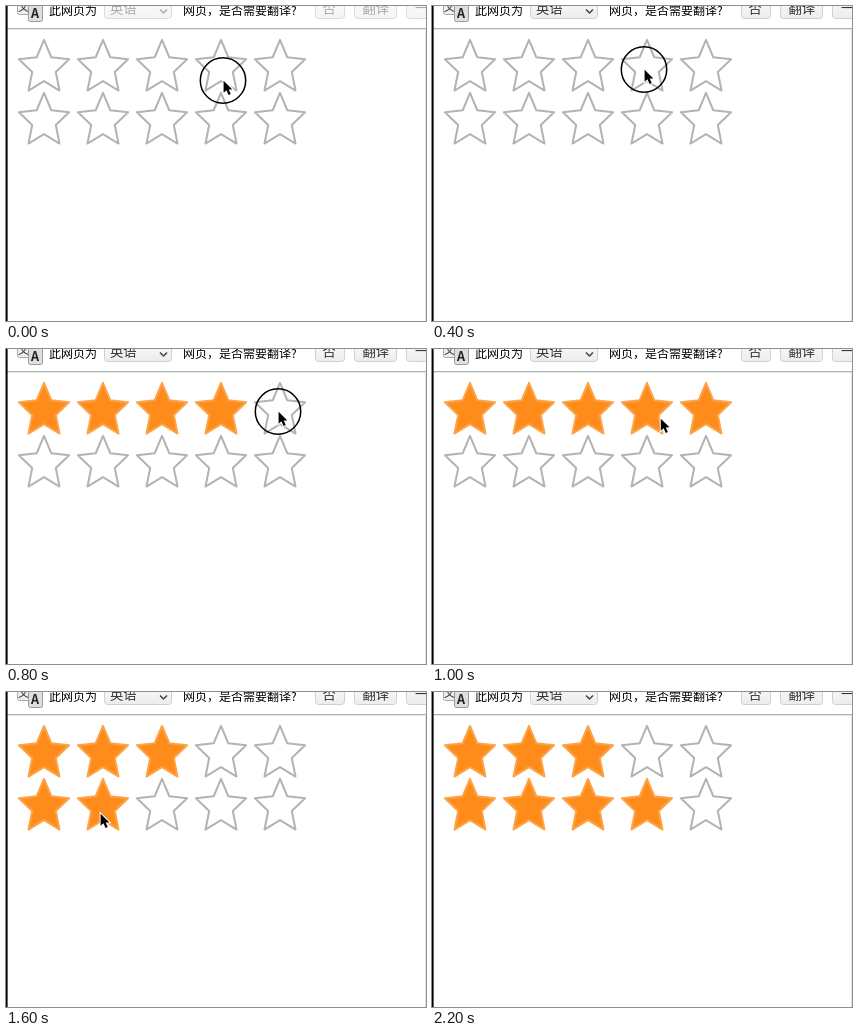
An HTML page with a canvas that plays this animation: 420 by 315 pixels, repeating every 2.3 s.

```html
<!DOCTYPE html>
<html lang="zh-CN">
<head>
<meta charset="utf-8">
<title>评分</title>
<style>
html, body { margin: 0; width: 100%; height: 100%; overflow: hidden; background: #fff; }
canvas { display: block; width: 420px; height: 315px; }
</style>
</head>
<body>
<canvas id="stage" width="420" height="315"></canvas>
<script>
const ctx = document.getElementById('stage').getContext('2d');
const LOOP = 2300, STEP = 100;
const FONT = '"Noto Sans CJK SC", "Noto Sans CJK", "Noto Sans", sans-serif';

// each press rates its row one step later
const PRESSES = [
  { at: 0, x: 217, y: 74, row: 0, count: 0 },
  { at: 400, x: 212, y: 63, row: 0, count: 4 },
  { at: 800, x: 272, y: 62, row: 0, count: 5 },
  { at: 1200, x: 158, y: 62, row: 0, count: 3 },
  { at: 1500, x: 94, y: 121, row: 1, count: 2 },
  { at: 1900, x: 216, y: 114, row: 1, count: 4 }
];
const EXIT = { at: 2200, x: 372, y: -30 };

// rest for one step after a press, then glide on a sagging line
function pointerAt(t) {
  const from = PRESSES.filter(p => p.at <= t).pop();
  const to = PRESSES.find(p => p.at > t) || EXIT;
  const k = (t - from.at - STEP) / (to.at - from.at - STEP);
  const e = Math.pow(Math.min(1, Math.max(0, k)), 0.87);
  const dx = to.x - from.x, dy = to.y - from.y;
  return [from.x + dx * e, from.y + dy * e + 0.065 * Math.abs(dx) * Math.sin(Math.PI * e)];
}

function ratingAt(row, t) {
  const last = PRESSES.filter(p => p.row === row && p.at + STEP <= t).pop();
  return last ? last.count : 0;
}

function text(s, x, y, size, color, weight = '') {
  ctx.font = `${weight} ${size}px ${FONT}`;
  ctx.fillStyle = color;
  ctx.fillText(s, x, y);
}

function box(x, y, w, h, r, fill, stroke) {
  ctx.beginPath();
  ctx.roundRect(x, y, w, h, r);
  ctx.fillStyle = fill;
  ctx.fill();
  ctx.lineWidth = 1;
  ctx.strokeStyle = stroke;
  ctx.stroke();
}

function control(x, w, label, textX, active) {
  const g = ctx.createLinearGradient(0, -8, 0, 13);
  g.addColorStop(0, '#fbfbfb');
  g.addColorStop(1, active ? '#ececec' : '#f4f4f4');
  box(x + 0.5, -8.5, w - 1, 21, 3, g, active ? '#d0d0d0' : '#dcdcdc');
  text(label, textX, 7.2, 13.3, active ? '#333' : '#aaa');
}

function header(active) {
  box(11.5, -8.5, 13, 17, 2, '#eeeeee', '#aaa');
  text('文', 12, 4.5, 11, '#333');
  box(22.5, -1.5, 14, 17, 2, '#dedede', '#999');
  text('A', 25, 12, 12.5, '#222', 'bold');

  text('此网页为', 43, 9.2, 12, '#000');
  text('网页，是否需要翻译?', 177, 9.2, 12, '#000');
  control(98, 68, '英语', 104, active);
  control(309, 30, '否', 316.5, active);
  control(348, 43, '翻译', 356.5, active);
  control(400, 90, '一律不翻译', 409, active);

  ctx.beginPath();
  ctx.moveTo(154, 3.5);
  ctx.lineTo(157.5, 7);
  ctx.lineTo(161, 3.5);
  ctx.lineWidth = 1.5;
  ctx.strokeStyle = active ? '#444' : '#aaa';
  ctx.stroke();

  ctx.fillStyle = '#b2b2b2';
  ctx.fillRect(0, 22, 420, 1.3);
}

function star(cx, cy, on) {
  ctx.beginPath();
  for (let i = 0; i < 10; i++) {
    const a = i * Math.PI / 5, k = i % 2 ? 0.47 : 1;
    ctx.lineTo(cx + 26.4 * k * Math.sin(a), cy - 28 * k * Math.cos(a));
  }
  ctx.closePath();
  ctx.lineJoin = 'round';
  ctx.lineWidth = 2;
  ctx.fillStyle = on ? '#ff8c1a' : '#fff';
  ctx.strokeStyle = on ? '#fba449' : '#b3b3b3';
  ctx.fill();
  ctx.stroke();
}

function pointer(x, y) {
  ctx.save();
  ctx.translate(x + 0.6, y + 0.8);
  ctx.scale(0.86, 0.86);
  ctx.beginPath();
  ctx.moveTo(0, 0);
  ctx.lineTo(0, 14);
  ctx.lineTo(3.3, 11);
  ctx.lineTo(5.8, 16.5);
  ctx.lineTo(8.3, 15.4);
  ctx.lineTo(5.9, 10.2);
  ctx.lineTo(10.2, 10);
  ctx.closePath();
  ctx.lineJoin = 'miter';
  ctx.lineWidth = 2.2;
  ctx.strokeStyle = '#fff';
  ctx.stroke();
  ctx.fillStyle = '#000';
  ctx.fill();
  ctx.restore();
}

function draw(t) {
  ctx.fillStyle = '#fff';
  ctx.fillRect(0, 0, 420, 315);
  header(t >= STEP);
  for (let row = 0; row < 2; row++) {
    const count = ratingAt(row, t);
    for (let i = 0; i < 5; i++) star(38 + 59 * i, 61.9 + 53 * row, i < count);
  }
  ctx.fillStyle = '#e4e4e4';
  ctx.fillRect(419, 23, 1, 292);
  ctx.fillStyle = '#000';
  ctx.fillRect(0, 0, 1.6, 315);

  const [x, y] = pointerAt(t);
  if (PRESSES.some(p => p.at === t)) {
    ctx.beginPath();
    ctx.arc(x, y + 0.5, 22.7, 0, Math.PI * 2);
    ctx.lineWidth = 1.5;
    ctx.strokeStyle = '#000';
    ctx.stroke();
  }
  pointer(x, y);
}

const start = performance.now();
function tick() {
  const t = (performance.now() - start) % LOOP;
  draw(Math.floor(t / STEP) * STEP);
  requestAnimationFrame(tick);
}
tick();
</script>
</body>
</html>
```
